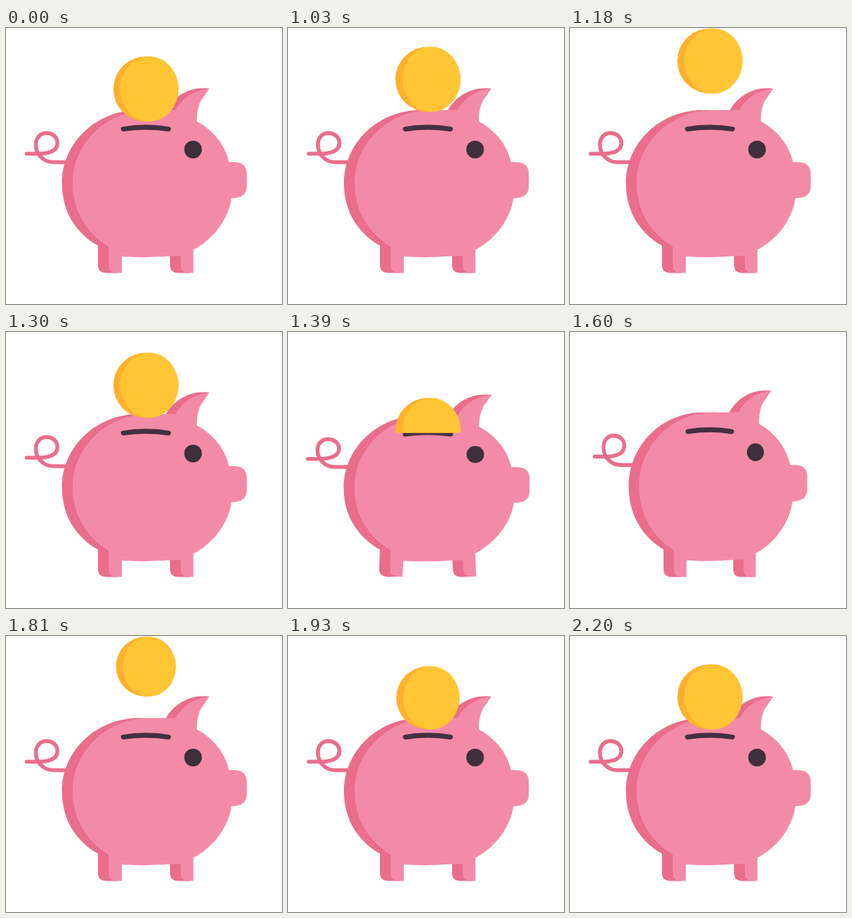
Write an HTML page with a canvas that moves like this. It is 360 px wide and 360 px high and loops after 2230 ms.

```html
<!DOCTYPE html>
<html lang="en">
<head>
<meta charset="utf-8">
<title>Piggy bank</title>
<style>
html, body { margin: 0; width: 100%; height: 100%; overflow: hidden; background: #fff; }
canvas { display: block; width: 100vmin; height: 100vmin; }
</style>
</head>
<body>
<canvas width="360" height="360"></canvas>
<script>
const ctx = document.querySelector('canvas').getContext('2d');
const LOOP = 2230, STEP = 30;
const LIGHT = '#f38ba8', SHADE = '#ea6d8b', DARK = '#433040', EYE = '#3e2f3a';

// Each part has a standing and a squashed outline with matching commands.
const parts = {
  tail: [
    'M27 164L46 164C60 163 67 158 67 150C67 142 60 137 53 137C44 137 39 144 39 152C39 166 50 175 62 175L78 175',
    'M9.5 188.5L35 188.5C50 188.5 60 187 60 184C60 182 52 181.5 45 181.5C36 181.5 30 183 30 185.5C30 189 45 190 55 191L75 192'],
  earBack: [
    'M208 108C218 90 238 76 265 79L240 115Z',
    'M211 137C226 125 248 118 272 126L250 145Z'],
  ear: [
    'M221 108C230 90 245 82 265 79C254 90 248 105 249 123L225 120Z',
    'M225 137C240 127 256 121 272 126C265 133 258 141 254 150L230 148Z'],
  back: [
    'M174 107C117 107 73 150 73 203C73 240 92 268 120 284L120 309Q120 319.5 131 319.5L145 319.5L190 107Z',
    'M170 136C114 136 68 172 68 215C68 248 90 264 116 281L104 298Q98 312 113 318L128 312L190 136Z'],
  leg: [
    'M214 290L214 309Q214 319.5 224 319.5L240 319.5L240 290Z',
    'M218 303L230 313Q238 320 245 318L250 312L236 300Z'],
  body: [
    'M188 107L225 107L249 122C272 134 286 154 291 175L299 175Q314 176 314 190L314 207Q314 222 294 222C290 250 270 276 244.5 289L244.5 319.5L237 319.5Q228 319 228 309L228 297L214 297.5Q183 300 151 298L151 319.5L143 319.5Q134 319 134 309L134 285C106 268 87 240 87 203C87 150 131 107 188 107Z',
    'M184 136L225 136L254 149C280 160 295 178 299 195L315 195Q331 196 331 208L331 224Q331 237 302 237C300 250 268 268 240 284L260 306L248 316Q244 314 238 310L232 305L218 305Q183 306 143 306L122 315L119 314Q114 306 119 299L131 282C105 264 83 248 83 215C83 172 128 136 184 136Z'],
  slot: ['M153 131.8Q182 127.2 212 131.8', 'M153 154.5Q184 158 215 154.5']
};

const lerp = (a, b, k) => a + (b - a) * k;
const ease = k => (1 - Math.cos(Math.PI * k)) / 2;
const arc = k => 4 * k * (1 - k);

function outline(name, k) {
  const [stand, squash] = parts[name];
  const ends = squash.match(/[\d.]+/g);
  let i = 0;
  return new Path2D(stand.replace(/[\d.]+/g, n => lerp(+n, +ends[i++], k).toFixed(2) + ' '));
}

function squashAt(t) {
  const keys = [[1380, 0], [1450, 1.25], [1567, -0.35], [1740, 0]];
  for (let i = 1; i < keys.length; i++) {
    const [t0, a] = keys[i - 1], [t1, b] = keys[i];
    if (t >= t0 && t < t1) return lerp(a, b, ease((t - t0) / (t1 - t0)));
  }
  return 0;
}

function drawPig(q) {
  const k = Math.max(0, q), stretch = Math.max(0, -q);
  const fill = (name, color) => { ctx.fillStyle = color; ctx.fill(outline(name, k)); };
  const stroke = (name, color, width) => {
    ctx.strokeStyle = color;
    ctx.lineWidth = width;
    ctx.stroke(outline(name, k));
  };
  ctx.save();
  ctx.translate(180, 319.5);
  ctx.scale(1 - 0.105 * stretch, 1 + 0.032 * stretch);
  ctx.translate(-180, -319.5);
  ctx.lineCap = ctx.lineJoin = 'round';
  stroke('tail', SHADE, 5);
  fill('earBack', SHADE);
  fill('back', SHADE);
  fill('leg', SHADE);
  fill('body', LIGHT);
  fill('ear', LIGHT);
  stroke('slot', k > 0.5 ? '#333' : DARK, 6.3);
  const w = lerp(23, 20, k), h = lerp(23, 7, k);
  ctx.fillStyle = k > 0.5 ? '#333' : EYE;
  ctx.beginPath();
  ctx.roundRect(lerp(244, 248.5, k) - w / 2, lerp(158.5, 178, k) - h / 2, w, h, Math.min(w, h) / 2);
  ctx.fill();
  ctx.restore();
}

function drawCoin(bottom, scale, floor) {
  ctx.save();
  ctx.beginPath();
  ctx.rect(0, 0, 360, floor);
  ctx.clip();
  ctx.translate(182.5, bottom);
  ctx.scale(scale, scale);
  for (const [x, rx, color] of [[0, 42.5, '#ffb02e'], [4.5, 38, '#ffc534']]) {
    ctx.fillStyle = color;
    ctx.beginPath();
    ctx.ellipse(x, -42.5, rx, 42.5, 0, 0, 7);
    ctx.fill();
  }
  ctx.restore();
}

function coinAt(t, q) {
  const REST = 122;
  if (t < 1000) return drawCoin(REST, 1, 360);
  if (t < 1480) {
    // Hop up, then drop through the slot.
    const u = t - 1000, late = Math.max(0, u - 300);
    return drawCoin(REST - 0.459 * u + 0.00142 * u * u + 0.0015 * late * late, 1,
      lerp(130, 155, Math.max(0, q)));
  }
  if (t < 1610) return;
  if (t < 1930) {
    const u = (t - 1610) / 320;
    return drawCoin(REST - 46 * arc(u), 0.97 * (1 - (1 - u) ** 3), 360);
  }
  drawCoin(REST - 8 * arc(Math.min(1, (t - 1930) / 270)),
    lerp(0.97, 1, Math.min(1, (t - 1930) / 60)), 360);
}

const start = performance.now();
function frame() {
  const now = (performance.now() - start) % LOOP;
  const t = Math.max(0, Math.floor((now - 10) / STEP) * STEP + 10);
  const q = squashAt(t);
  ctx.fillStyle = '#fff';
  ctx.fillRect(0, 0, 360, 360);
  drawPig(q);
  coinAt(t, q);
  requestAnimationFrame(frame);
}
frame();
</script>
</body>
</html>
```
